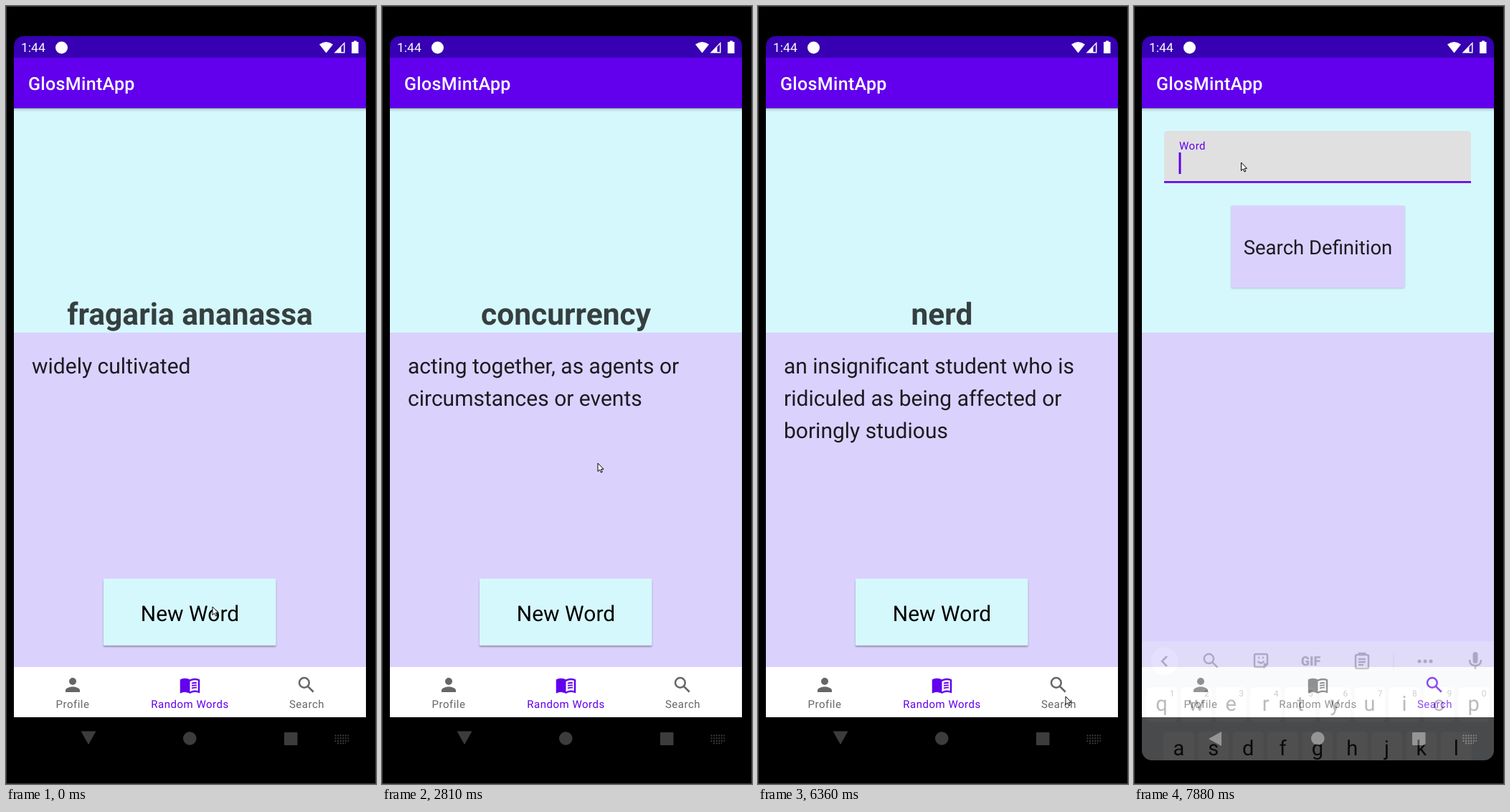
These frames come from a looping animation (516x1084 px, 8 s). An HTML page:

```html
<!DOCTYPE html>
<html lang="en">
<head>
<meta charset="utf-8">
<title>Vocabulary app</title>
<style>
  html, body { margin: 0; width: 100%; height: 100%; overflow: hidden; background: #000; }
  svg { display: block; width: 516px; height: 1084px; font-family: Roboto, sans-serif; text-rendering: geometricPrecision; }
  .mid { text-anchor: middle; }
  .word { font-size: 42.5px; font-weight: 700; fill: #363f40; }
  .definition { font-size: 30px; fill: #1c1b21; }
  .tab { color: #666; }
  .tab.active { color: #6200ee; }
  .tab text { font-size: 15px; letter-spacing: .5px; fill: currentColor; }
  .low { filter: drop-shadow(0 1px 1px rgba(0, 0, 0, .2)); }
</style>
</head>
<body>
<svg viewBox="0 0 516 1084">
  <defs>
    <clipPath id="screenClip"><rect x="11" y="42" width="491" height="1009" rx="14"/></clipPath>
    <clipPath id="navClip"><rect x="11" y="921" width="491" height="70"/></clipPath>
    <linearGradient id="barShadow" x2="0" y2="1">
      <stop stop-color="#000" stop-opacity=".18"/><stop offset="1" stop-color="#000" stop-opacity="0"/>
    </linearGradient>
    <g id="searchIcon" fill="none" stroke="currentColor" stroke-width="2">
      <circle cx="9.5" cy="9.5" r="5.5"/><path d="M13.6 13.6l6.2 6.2"/>
    </g>
  </defs>
  <rect width="516" height="1084"/>
  <rect x=".5" y=".5" width="515" height="1083" fill="none" stroke="#3c3c3c"/>

  <g clip-path="url(#screenClip)">
    <rect x="11" y="42" width="491" height="30" fill="#3700b3"/>
    <rect x="11" y="72" width="491" height="70.5" fill="#6200ee"/>
    <rect x="11" y="142.5" width="491" height="312.5" fill="#d5f8fd"/>
    <rect x="11" y="142.5" width="491" height="5" fill="url(#barShadow)"/>
    <rect x="11" y="455" width="491" height="466" fill="#dad2fd"/>
    <rect x="11" y="921" width="491" height="70" fill="#fff"/>

    <g fill="#fff">
      <text x="21" y="64" font-size="17.5">1:44</text>
      <circle cx="77.5" cy="58" r="8.5"/>
      <path d="M446.500 65.500L437 53.500Q446.500 46.500 456 53.500Z"/>
      <path d="M457.500 65.500L472.500 50V65.500ZM467.500 57V64H471V53.500Z" fill-rule="evenodd"/>
      <path d="M485 50V48.500H489V50H491.500V66H482V50Z"/>
      <text x="31" y="117" font-size="25" font-weight="500" letter-spacing=".31">GlosMintApp</text>
    </g>

    <g id="randomPage">
      <text id="word" class="word mid" x="256.500" y="444"/>
      <g id="definition" class="definition"></g>
      <rect id="newButton" x="136" y="798" width="240.500" height="93" rx="1.500" fill="#d5f8fd"/>
      <text class="mid" x="256.500" y="857" font-size="30">New Word</text>
    </g>

    <g id="searchPage">
      <path d="M42 246.500V179Q42 174 47 174H465Q470 174 470 179V246.500Z" fill="#e0e0e0"/>
      <rect id="underline" x="42" width="428"/>
      <text id="label" x="63">Word</text>
      <rect id="caret" x="62.500" y="204" width="3" height="30" fill="#6200ee"/>
      <rect class="low" x="135.500" y="278" width="242" height="114.500" rx="1.500" fill="#dad2fd"/>
      <text class="mid" x="256.500" y="346" font-size="27.500" fill="#1c1b21">Search Definition</text>
    </g>

    <circle id="ripple" cx="419" cy="956" r="84" fill="#d4d4d4" clip-path="url(#navClip)"/>
    <g class="tab">
      <g transform="translate(78 931) scale(1.25)" fill="currentColor">
        <circle cx="12" cy="8" r="4"/><path d="M4 20V18C4 15.300 9.300 14 12 14S20 15.300 20 18V20Z"/>
      </g>
      <text class="mid" x="93" y="978">Profile</text>
    </g>
    <g id="randomTab" class="tab">
      <g transform="translate(241.500 931) scale(1.25)">
        <path fill="currentColor" fill-rule="evenodd" d="M12 6Q10 4.500 6.500 4.500T1 6V20.600Q1 21.200 1.700 21.100Q4 20 6.500 20T12 21.500Q14.500 20 17.500 20T22.200 21Q23 21.200 23 20.600V6Q21 4.500 17.500 4.500T12 6ZM12 8Q14.500 6.500 17.500 6.500Q19.500 6.500 21 7V18.500Q19.500 18 17.500 18Q14.500 18 12 19.500Z"/>
        <path fill="none" stroke="currentColor" stroke-width="1.500" d="M14 10.300Q16.500 9.300 19.500 9.800M14 13Q16.500 12 19.500 12.400M14 15.700Q16.500 14.700 19.500 15"/>
      </g>
      <text class="mid" x="256.500" y="978">Random Words</text>
    </g>
    <g id="searchTab" class="tab">
      <use href="#searchIcon" transform="translate(404 931) scale(1.25)"/>
      <text class="mid" x="419.500" y="978">Search</text>
    </g>

    <g id="systemNav">
      <path id="back"/>
      <circle cx="256.300" cy="1020.500" r="9.300"/>
      <rect x="388" y="1012" width="18.500" height="18" rx="1"/>
      <path fill="none" stroke="currentColor" stroke-width="2" stroke-dasharray="2 1.600" d="M458.500 1016.500H478M458.500 1020.300H478M458.500 1024H478M462 1027.300H474"/>
    </g>

    <g id="keyboard">
      <rect x="11" y="885" width="491" height="330" fill="#eceef1"/>
      <circle cx="42.500" cy="913" r="19" fill="#fff"/>
      <g fill="none" stroke="#44474a" stroke-width="2.500">
        <path d="M46 906L39 913L46 920"/>
        <rect x="309" y="904" width="18" height="19" rx="2"/>
        <path d="M314 904V902H322V904M313 910H323M313 914H323M313 918H320"/>
        <path d="M183 921H170Q168 921 168 919V905Q168 903 170 903H184Q186 903 186 905V917L182 921V917H186M172.500 913Q177 918 181.500 913M173 908H175M179 908H181"/>
        <path d="M468 911Q468 919 476 919T484 911M476 919V924"/>
      </g>
      <g fill="#44474a">
        <rect x="472.500" y="900" width="7" height="16" rx="3.500"/>
        <circle cx="398" cy="913" r="2.500"/><circle cx="406" cy="913" r="2.500"/><circle cx="414" cy="913" r="2.500"/>
        <text class="mid" x="246.500" y="919" font-size="18" font-weight="900">GIF</text>
      </g>
      <use href="#searchIcon" color="#44474a" transform="translate(93 898) scale(1.200)"/>
      <path d="M362 901V926" stroke="#c8cacd"/>
      <g id="keys"></g>
    </g>
  </g>
  <path id="pointer" d="M0 0V11.500L2.700 9L4.500 13L6.300 12.200L4.600 8.300H8Z" fill="#fff" stroke="#000" stroke-linejoin="round"/>
</svg>
<script>
const LOOP = 8000;
const $ = id => document.getElementById(id);
const set = (id, attrs) => { for (const k in attrs) $(id).setAttribute(k, attrs[k]); };
const show = (id, on) => set(id, { display: on ? "inline" : "none" });

// Each entry starts at its first value and holds until the next one.
const pointerSteps = [
  [0, 288, 837], [120, 278, 830], [240, 268, 823], [610, 267, 837],
  [2400, 274, 802], [2530, 282, 763], [2810, 301, 637], [3180, 333, 717],
  [3320, 327, 752], [3440, 318, 798], [3560, 309, 834], [3690, 303, 854],
  [3810, 299, 852], [3930, 298, 849], [4910, 296, 849],
  [5440, 380, 920], [5560, 458, 968], [5710, 442, 964], [5830, 432, 962],
  [6360, 429, 962], [6880, 348.5, 534], [7000, 210, 165], [7130, 153, 202], [7280, 149.5, 218]
];
const wordSteps = [
  [0, "fragaria ananassa", "widely cultivated"],
  [1510, "concurrency", "acting together, as agents or", "circumstances or events"],
  [5160, "nerd", "an insignificant student who is", "ridiculed as being affected or", "boringly studious"]
];
const rippleSteps = [[0, 0], [6880, 1], [7000, .5], [7130, 0]];
const focusSteps = [[0, 0], [7400, .35], [7520, 1]];
const keyboardSteps = [[0, 0, 0], [7760, .1, 50], [7880, .31, 0]];
const at = (steps, t) => steps.findLast(s => s[0] <= t);
const during = (t, from, to) => t >= from && t < to;

function keyRow(letters, firstX, top, hints) {
  return [...letters].map((letter, i) => {
    const x = firstX + 48.35 * i;
    const hint = hints ? `<text class="mid" x="${x + 14.5}" y="${top + 13}" font-size="12" fill="#5f6368">${(i + 1) % 10}</text>` : "";
    return `<rect x="${x - 21.5}" y="${top}" width="43" height="49" rx="6" fill="#fff"/>
      <text class="mid" x="${x}" y="${top + 33}" font-size="29" fill="#202124">${letter}</text>${hint}`;
  }).join("");
}
$("keys").innerHTML = keyRow("qwertyuiop", 38.5, 949, true) + keyRow("asdfghjkl", 62.5, 1011, false);

let shownWord;
function drawWord(entry) {
  if (entry === shownWord) return;
  shownWord = entry;
  const [, word, ...lines] = entry;
  $("word").textContent = word;
  $("definition").innerHTML = lines.map((line, i) => `<text x="36" y="${511.5 + 45 * i}">${line}</text>`).join("");
}

function drawField(focus) {
  const focused = focus > 0;
  set("label", {
    y: 220 - 20 * focus,
    "font-size": 22.5 - 7.5 * focus,
    "letter-spacing": .5 * focus,
    fill: focused ? "#6200ee" : "#616161"
  });
  set("underline", { y: focused ? 244 : 245.2, height: focused ? 2.6 : 1.3, fill: focused ? "#6200ee" : "#666" });
  show("caret", focus === 1);
}

function draw(t) {
  const searching = t >= 6880;
  show("randomPage", !searching);
  show("searchPage", searching);
  $("randomTab").classList.toggle("active", !searching);
  $("searchTab").classList.toggle("active", searching);

  drawWord(at(wordSteps, t));
  const pressed = during(t, 860, 980) || during(t, 4080, 4200);
  $("newButton").style.filter = `drop-shadow(0 ${pressed ? 4 : 2}px ${pressed ? 2.5 : 1.3}px rgba(0,0,0,.3))`;

  drawField(at(focusSteps, t)[1]);
  set("ripple", { opacity: at(rippleSteps, t)[1] });

  const [, alpha, drop] = at(keyboardSteps, t);
  const typing = alpha > 0;
  set("keyboard", { opacity: alpha, transform: `translate(0 ${drop})` });
  set("systemNav", { fill: typing ? "#666" : "#3c3c3c", color: typing ? "#555" : "#3c3c3c" });
  set("back", { d: typing ? "M104 1021L122 1011V1031Z" : "M104.500 1010.500H125.500L115 1029Z" });

  const [, x, y] = at(pointerSteps, t);
  set("pointer", { transform: `translate(${x} ${y})` });
}

const start = performance.now();
function tick() {
  draw((performance.now() - start) % LOOP);
  requestAnimationFrame(tick);
}
tick();
</script>
</body>
</html>
```
